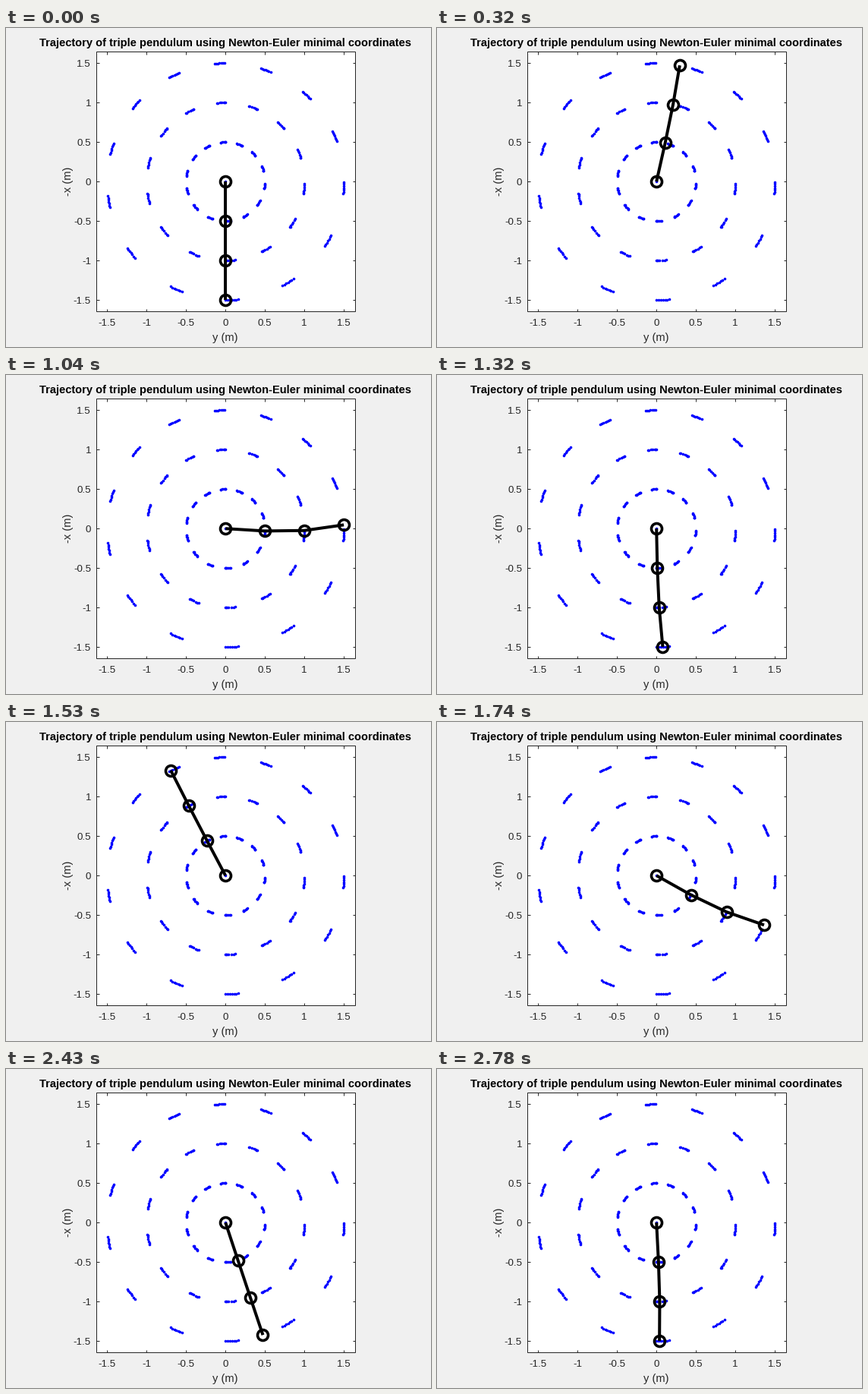
A matplotlib script that plays this animation: 560 px wide and 420 px high, repeating every 2850 ms.

```python
import numpy as np
import matplotlib.pyplot as plt
from matplotlib.animation import FuncAnimation
from matplotlib.patches import Rectangle

W, H = 560, 420
CX, CY, UNIT = 289.2, 202.2, 104   # pivot and pixels per metre
L, R, T, B = 119, 460, 31, 373     # plot box
INK = "#262626"
LOOP, TICK = 2850, 10

STEPS, TURNS = 14, 7               # trajectory samples per turn, turns plotted
DRIFT = 1.0026                     # each turn lands slightly further on
RADII = np.array([0.5, 1.0, 1.5])
TRAIL = np.array([1.0, 0.6, 0.0])  # how strongly each joint trails the tip

# when each pose appears (ms), and how many samples have passed by then
TIMES = [0, 320, *range(830, 1811, 70), *range(1870, 2781, 70)]
KEY_T = [0, 320, 830, 1740, 2080, 2780]
KEY_S = [0, 6.5, 9.2, 44.31, 57.23, 84.05]


def px(n):
    """Pixels to points."""
    return n * 0.72


def joints(s):
    """Joint positions after s samples: fast at the bottom, slow on top."""
    turn = 2 * np.pi * s / STEPS
    tip = turn + np.radians(6.9) * np.sin(turn)
    bend = 4 * np.sin(tip) + 1.6 * np.sin(turn / 8)
    a = tip - np.radians(bend) * TRAIL
    return CX + UNIT * RADII * np.sin(a), CY + UNIT * RADII * np.cos(a)


plt.rcParams["font.family"] = "Liberation Sans"
fig = plt.figure(figsize=(W / 100, H / 100), dpi=100, facecolor="#f0f0f0")
ax = fig.add_axes([0, 0, 1, 1])
ax.set_xlim(0, W)
ax.set_ylim(H, 0)
ax.axis("off")


def label(x, y, text, size, **kw):
    kw = {"ha": "center", "va": "baseline", "color": INK, **kw}
    ax.text(x, y, text, fontsize=px(size), **kw)


def stroke(xs, ys):
    ax.plot(xs, ys, color=INK, lw=px(1), solid_capstyle="butt", zorder=2)


ax.add_patch(Rectangle((L, T), R - L, B - T, fc="white", ec=INK, lw=px(1), zorder=1))
for v in np.arange(-1.5, 1.6, 0.5):
    x, y = CX + v * UNIT, CY - v * UNIT
    for edge, d in ((B, -3), (T, 4)):
        stroke([x, x], [edge, edge + d])
    for edge, d in ((L, 4), (R, -3)):
        stroke([edge, edge + d], [y, y])
    label(x - 0.3, 392, f"{v:g}", 13.33)
    label(112, y + 4.5, f"{v:g}", 13.33, ha="right")

label(289.2, 24, "Trajectory of triple pendulum using Newton-Euler minimal coordinates",
      14.67, weight="bold", color="black")
label(289.2, 412.3, "y (m)", 14.67)
label(86, 202.2, "-x (m)", 14.67, rotation=90, rotation_mode="anchor")

dots = np.hstack([joints(k * DRIFT) for k in range(STEPS * TURNS)])
ax.plot(np.append(dots[0], CX), np.append(dots[1], CY), "o", color="blue",
        ms=px(3.6), mew=0, zorder=3)

chain, = ax.plot([], [], "o-", color="black", lw=px(4), ms=px(14), mfc="none",
                 mew=px(3.6), solid_capstyle="butt", zorder=4)


def draw(n):
    t = TIMES[np.searchsorted(TIMES, n * TICK, side="right") - 1]
    x, y = joints(np.interp(t, KEY_T, KEY_S))
    chain.set_data(np.append(CX, x), np.append(CY, y))
    return chain,


anim = FuncAnimation(fig, draw, frames=LOOP // TICK, interval=TICK,
                     repeat=True, repeat_delay=0, blit=False)
plt.show()
```
